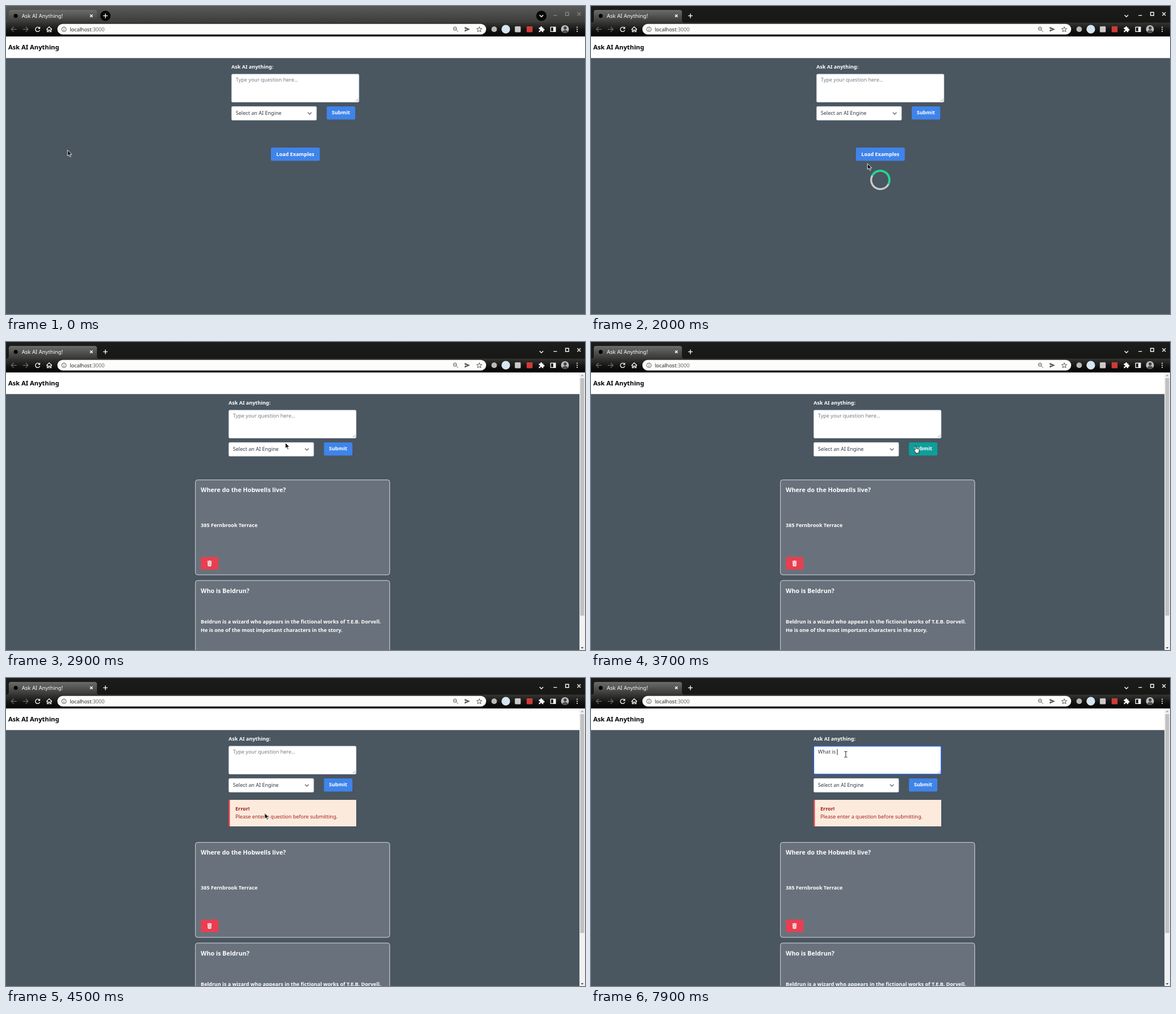
These frames come from a looping animation (1025 px wide and 546 px high, 8 s). An HTML page:

```html
<!DOCTYPE html>
<html lang="en">
<head>
<meta charset="utf-8">
<title>Ask AI Anything!</title>
<style>
html, body { margin: 0; width: 100%; height: 100%; overflow: hidden; background: #4a5660; }
svg { display: block; width: 100%; height: 100%; }
text { font: 9.05px "Noto Sans", "Open Sans", sans-serif; white-space: pre; }
.b { font-weight: 700; fill: #fff; }
.h { font-size: 10.75px; }
.mid { text-anchor: middle; }
.line { fill: none; stroke-width: 1.3; }
.field { fill: #fff; stroke: #cbd5e0; stroke-width: .6; }
.card { fill: #69727c; stroke: #e4e8ec; stroke-width: .9; }
.button { fill: #3f84ea; }
.button.hover { fill: #0d9f9b; }
.ctl { fill: none; stroke: #fff; stroke-width: 1.4; }
.idle .ctl { stroke: #858585; }
.idle .ctl.keep { stroke: #fff; }
.disc { fill: none; }
.idle .disc { fill: #080808; }
.bar { fill: url(#barActive); }
.idle .bar { fill: url(#barIdle); }
</style>
</head>
<body>
<svg viewBox="0 0 1025 546" preserveAspectRatio="none">
  <defs>
    <linearGradient id="barIdle" x2="0" y2="1"><stop stop-color="#5a5a59"/><stop offset="1" stop-color="#3b3b3a"/></linearGradient>
    <linearGradient id="barActive" x2="0" y2="1"><stop stop-color="#1c1c1b"/><stop offset="1" stop-color="#171716"/></linearGradient>
    <linearGradient id="tabFill" x2="0" y2="1"><stop stop-color="#6c6c6b"/><stop offset="1" stop-color="#353534"/></linearGradient>
    <linearGradient id="tools" x2="0" y2="1"><stop stop-color="#353534"/><stop offset=".5" stop-color="#161615"/><stop offset="1" stop-color="#020202"/></linearGradient>
    <g id="trash" fill="#fff">
      <path d="M-4-4.2H-1.6L-1-5H1L1.6-4.2H4V-3H-4ZM-3.4-2.3H3.4L3 4Q2.9 5 2 5H-2Q-2.9 5-3 4Z"/>
      <path d="M-1.5-1V3.6M0-1V3.6M1.5-1V3.6" stroke="#e93e51" stroke-width=".6"/>
    </g>
    <clipPath id="face"><circle cx="989.5" cy="41" r="7"/></clipPath>
  </defs>

  <rect width="1025" height="546" fill="#4a5660"/>
  <rect y="54" width="1025" height="38.3" fill="#fff"/>
  <text class="b" x="4" y="77" style="font-size:11.25px;fill:#000">Ask AI Anything</text>

  <g id="form">
    <text class="b" x="399" y="111">Ask AI anything:</text>
    <rect id="area" class="field" x="399.3" y="120.8" width="225.6" height="49.6" rx="2"/>
    <path d="M619 169.2L624 164.2M622 169.2L624 167.2" stroke="#777" stroke-width=".7"/>
    <text id="entry" x="406.8" y="134"></text>
    <rect id="caret" y="126" width="1" height="10.5" fill="#222"/>
    <rect class="field" x="399.3" y="178.1" width="150.5" height="24.3" rx="2"/>
    <text x="406.8" y="193" fill="#2d3748">Select an AI Engine</text>
    <path class="line" d="M534.3 188.6L537.6 191.9L540.9 188.6" stroke="#4a5568"/>
    <rect id="submit" class="button" x="567.8" y="178" width="50.4" height="23.3" rx="2"/>
    <text class="b mid" x="592.8" y="192.3">Submit</text>
  </g>

  <g id="loader">
    <rect id="load" class="button" x="469" y="251" width="86.5" height="23.5" rx="2"/>
    <text class="b mid" x="512.2" y="265.6">Load Examples</text>
    <g id="spinner" fill="none" stroke-width="3.4">
      <circle cx="512.2" cy="308.4" r="16.2" stroke="#cbcbcb"/>
      <path d="M496 308.4A16.2 16.2 0 0 1 528.4 308.4" stroke="#12dc92"/>
    </g>
  </g>

  <g id="error">
    <rect x="394" y="216" width="226" height="47" fill="#fcebdd"/>
    <rect x="394" y="216" width="2.4" height="47" fill="#e5484d"/>
    <g fill="#a4211b">
      <text x="406" y="235" font-weight="700" style="font-weight:700">Error!</text>
      <text x="406" y="249.2">Please enter a question before submitting.</text>
    </g>
  </g>

  <g id="cards">
    <rect class="card" x="335.3" y="244.4" width="344" height="168.4" rx="4"/>
    <text class="b h" x="344.8" y="266">Where do the Hobwells live?</text>
    <text class="b" x="344.8" y="327.5">385 Fernbrook Terrace</text>
    <rect x="345" y="381.2" width="31" height="22.4" rx="1.5" fill="#e93e51"/>
    <use href="#trash" x="360.3" y="392.5"/>
    <rect class="card" x="335.3" y="422.8" width="344" height="168.4" rx="4"/>
    <text class="b h" x="344.8" y="445">Who is Beldrun?</text>
    <text class="b" x="344.8" y="499.3">Beldrun is a wizard who appears in the fictional works of T.E.B. Dorvell.</text>
    <text class="b" x="344.8" y="513.8">He is one of the most important characters in the story.</text>
  </g>

  <g id="scroll">
    <rect x="1015.2" y="54" width="9.8" height="492" fill="#f1f1f1"/>
    <rect id="thumb" x="1016.6" y="64" width="7" fill="#c1c1c1"/>
    <path d="M1017.7 60.5H1022.5L1020.1 57.7Z" fill="#999"/>
    <path d="M1017.7 541H1022.5L1020.1 543.8Z" fill="#444"/>
  </g>

  <g id="browser">
    <rect class="bar" width="1025" height="30"/>
    <rect y="29.5" width="1025" height="24.5" fill="url(#tools)"/>
    <path d="M0 30Q5 30 5 25V11Q5 7 9 7H157Q161 7 161 11V25Q161 30 166 30Z" fill="url(#tabFill)"/>
    <circle cx="17.2" cy="17.6" r="3.5"/>
    <text x="28" y="21" fill="#fff" style="font-size:9.5px">Ask AI Anything!</text>
    <path class="ctl keep" d="M148.8 15.2L153.4 19.8M153.4 15.2L148.8 19.8"/>
    <circle class="disc" cx="176" cy="17.4" r="9.2"/>
    <path class="ctl keep" d="M172 17.4H180M176 13.4V21.4"/>
    <circle class="disc" cx="947.8" cy="17.4" r="9.2"/>
    <path class="ctl keep" d="M944.6 16L947.8 19.2L951 16"/>
    <path class="ctl" d="M969.2 16.6H975.4M990.6 11.2H996.2V16.8H990.6ZM1011.4 11.2L1017.2 17M1017.2 11.2L1011.4 17"/>

    <path class="line" d="M18.6 41.3H9.4M13.6 37L9.3 41.3L13.6 45.6M29.8 41.3H39M34.8 37L39.1 41.3L34.8 45.6" stroke="#6c6c6c"/>
    <path class="line" d="M59.2 38.9A4 4 0 1 0 59.9 42.6" stroke="#fff"/>
    <path d="M60.4 36.5V40.6H56.3Z" fill="#fff"/>
    <path class="line" d="M71.6 41.6L76.5 36.9L81.4 41.6M73.2 40.6V45.6H75.2V42.6H77.8V45.6H79.8V40.6" stroke="#fff"/>
    <rect x="91" y="31.8" width="759" height="18.8" rx="9.4" fill="#fdfdfc"/>
    <g class="line" stroke="#555" style="stroke-width:1">
      <circle cx="102.6" cy="41.3" r="4"/>
      <path d="M102.6 40.7V43.6M102.6 38.8V39.8"/>
      <circle cx="794.9" cy="40.2" r="3"/>
      <path d="M797 42.4L800.4 45.8M793.4 40.2H796.4"/>
      <path d="M837.8 36.8L839.1 39.9L842.4 40.1L839.9 42.3L840.7 45.6L837.8 43.8L834.9 45.6L835.7 42.3L833.2 40.1L836.5 39.9Z"/>
    </g>
    <path d="M812 37L821.6 41.3L812 45.6V42.4L817 41.3L812 40.2Z" fill="#555"/>
    <text x="113" y="44.6" fill="#202124">localhost<tspan fill="#666">:3000</tspan></text>

    <circle cx="864.2" cy="41.2" r="4.9" fill="#b9b9b9"/>
    <circle cx="884.8" cy="41.2" r="7.6" fill="#d5e5f2"/>
    <rect x="900.8" y="36" width="10.4" height="10.4" rx="1.5" fill="#c9cac8"/>
    <rect x="921.7" y="36" width="10.4" height="10.4" rx="1" fill="#cf3b36"/>
    <path d="M943.4 38.2H946A1.6 1.6 0 1 1 949 38.2H951.2V40.6A1.6 1.6 0 1 1 951.2 43.6V46.2H948.7A1.5 1.5 0 1 0 945.9 46.2H943.4V43.5A1.5 1.5 0 1 0 943.4 40.8Z" fill="#fff"/>
    <path d="M964.2 37.3H972.8V45.3H964.2Z" fill="none" stroke="#fff" stroke-width="1.3"/>
    <path d="M968.8 37H973V45.4H968.8Z" fill="#fff"/>
    <g clip-path="url(#face)">
      <rect x="982" y="34" width="15" height="15" fill="#b9bec0"/>
      <circle cx="989.8" cy="39" r="2.7" fill="#4b413d"/>
      <ellipse cx="989.8" cy="47" rx="5.2" ry="4.6" fill="#4a5056"/>
    </g>
    <path d="M1011.2 36.8V38.6M1011.2 40.4V42.2M1011.2 44V45.8" stroke="#fff" stroke-width="1.8"/>
  </g>

  <g id="pointer">
    <path id="arrow" d="M.4 .4V10.8L2.9 8.6L4.7 12.5L6.4 11.7L4.7 8H8Z" fill="#111" stroke="#fff" stroke-width=".9"/>
    <path id="hand" d="M-1 6.8V.5A1 1 0 0 1 1 .5V4.4L5.3 5.3Q6.3 5.6 6.2 6.9L5.5 10.4V12.6H-.3V11L-2.9 8Q-3.2 6.5-1.9 6.4Z" fill="#fff" stroke="#111" stroke-width=".9"/>
    <path id="beam" d="M-2.6-4.9Q0-5.2 0-3.8Q0-5.2 2.6-4.9M0-4V4.6M-2.6 5.5Q0 5.8 0 4.4Q0 5.8 2.6 5.5" fill="none" stroke="#222"/>
  </g>
</svg>
<script>
const LOOP = 8000, TICK = 100;
const FOCUS = 1500, SPIN = 1600, LOADED = 2100, ERROR = 4000, EDIT = 5000;

// time, x, y of the pointer
const path = [
  [0, 108.5, 255], [300, 240, 305], [400, 359.5, 345],
  [600, 415, 318], [700, 490, 272], [800, 548, 250], [900, 561, 244.5],
  [1000, 538, 256], [1100, 508, 263], [1200, 495, 265],
  [1900, 493, 268], [2000, 489, 279], [2100, 516.5, 326.5],
  [2200, 508, 327], [2300, 487.5, 322], [2400, 359.5, 296],
  [2700, 398, 266], [2800, 456, 212], [2900, 494, 178],
  [3100, 503, 178], [3200, 522, 181], [3300, 546, 185], [3400, 567, 187],
  [3500, 578, 186], [3600, 577, 185], [3700, 575, 184.5],
  [4200, 560, 195], [4300, 520, 218], [4400, 480, 234], [4500, 457.5, 239],
  [4600, 455, 214], [4700, 453, 182], [4900, 452, 150], [5000, 451, 135]
];
// time, text, caret shown
const typing = [
  [0, "", false], [EDIT, "", true], [5500, "", false], [6000, "W", true],
  [6200, "Wha", true], [6400, "What", true], [7000, "What", false],
  [7200, "What i", true], [7700, "What is", true], [7900, "What is ", true]
];

const $ = id => document.getElementById(id);
const at = (rows, t) => rows.findLast(row => row[0] <= t);
const show = (id, on) => $(id).style.display = on ? "" : "none";
const set = (id, attrs) => Object.entries(attrs).forEach(([k, v]) => $(id).setAttribute(k, v));
const inside = (x, y, l, t, r, b) => x >= l && x <= r && y >= t && y <= b;

function draw(t) {
  const loaded = t >= LOADED, error = t >= ERROR, editing = t >= EDIT;
  const shift = loaded ? -5 : 0;
  const [, x, y] = at(path, t);
  const overLoad = !loaded && inside(x, y, 469, 251, 555, 274);
  const overSubmit = inside(x, y, 568 + shift, 178, 618 + shift, 201);
  const overArea = inside(x, y, 399 + shift, 120, 625 + shift, 171);

  $("browser").classList.toggle("idle", t < FOCUS);
  set("form", { transform: `translate(${shift})` });
  show("loader", !loaded);
  show("spinner", t >= SPIN);
  set("spinner", { transform: `rotate(${28 + (t - 2000) * .36} 512.2 308.4)` });
  show("cards", loaded);
  show("scroll", loaded);
  show("error", error);
  set("cards", { transform: `translate(0 ${error ? 47 : 0})` });
  set("thumb", { height: error ? 388 : 421 });
  $("load").classList.toggle("hover", overLoad);
  $("submit").classList.toggle("hover", overSubmit);
  $("area").style.cssText = editing ? "stroke:#2563eb;stroke-width:1.5" : "";

  const [, text, caret] = at(typing, t);
  const entry = $("entry");
  entry.textContent = text || "Type your question here...";
  entry.style.fill = text ? "#2d3748" : "#727c89";
  show("caret", caret);
  set("caret", { x: 406.8 + (text ? entry.getComputedTextLength() : 0) });

  set("pointer", { transform: `translate(${x} ${y})` });
  show("hand", overLoad || overSubmit);
  show("beam", overArea);
  show("arrow", !(overLoad || overSubmit || overArea));
}

const start = performance.now();
function frame() {
  const t = (performance.now() - start) % LOOP;
  draw(Math.floor(t / TICK) * TICK);
  requestAnimationFrame(frame);
}
frame();
</script>
</body>
</html>
```
